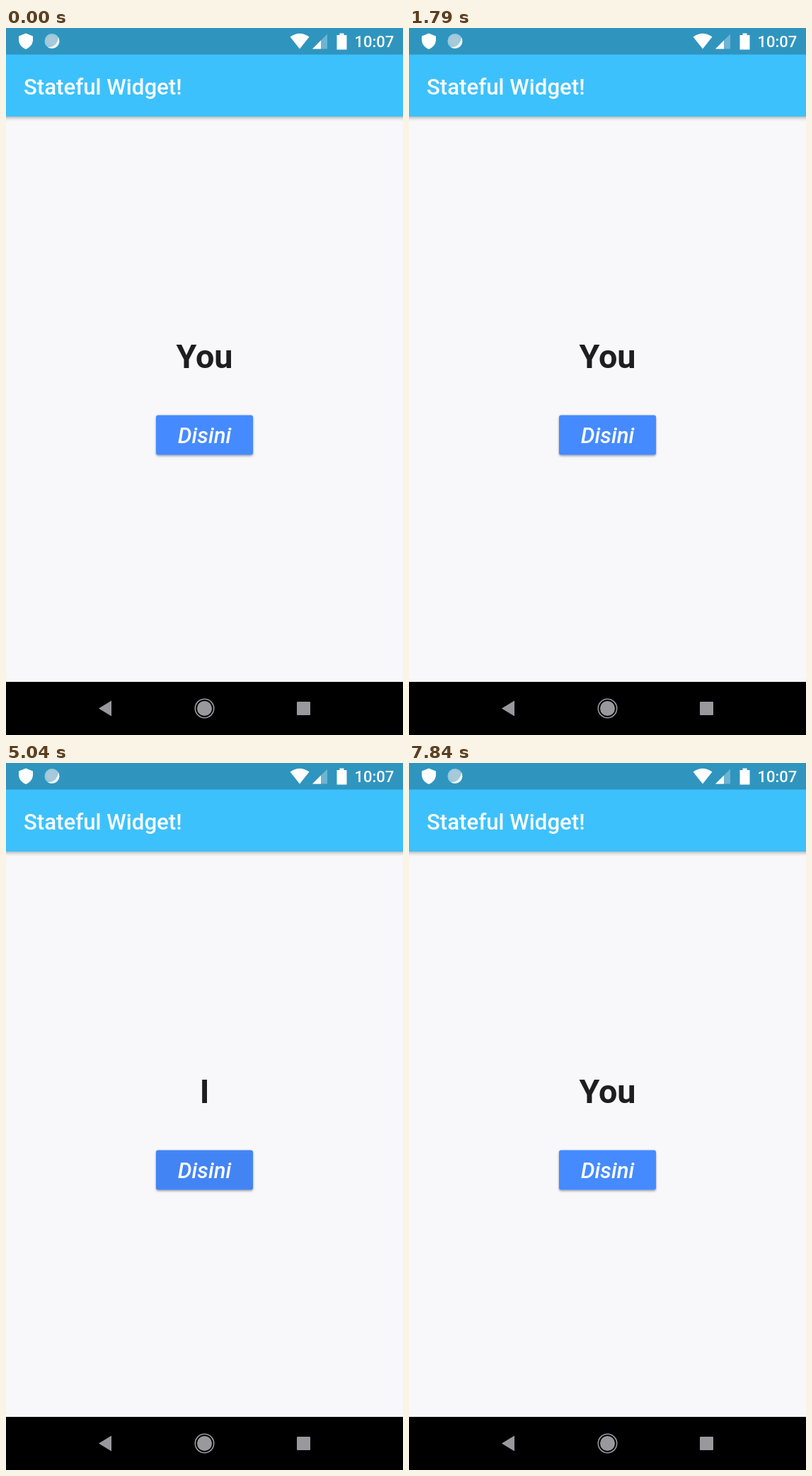
These frames come from a looping animation (561 by 998 pixels, 8 s). An HTML page:

```html
<!DOCTYPE html>
<html lang="en">
<head>
<meta charset="utf-8">
<title>Stateful Widget</title>
<style>
  html, body { margin: 0; width: 100%; height: 100%; overflow: hidden; background: #f8f8fb; }
  svg { display: block; width: 100%; height: 100%; }
  text { font-family: Roboto, sans-serif; font-weight: 500; fill: #fff; }
</style>
</head>
<body>
<svg viewBox="0 0 561 998">
  <defs>
    <filter id="barShadow" x="-5%" y="-5%" width="110%" height="120%">
      <feDropShadow dx="0" dy="2" stdDeviation="2.5" flood-opacity=".3"/>
    </filter>
    <filter id="buttonShadow" x="-10%" y="-10%" width="120%" height="130%">
      <feDropShadow dx="0" dy="1.5" stdDeviation="1.5" flood-opacity=".4"/>
    </filter>
    <clipPath id="buttonClip"><rect x="212" y="546.5" width="137" height="56" rx="3"/></clipPath>
  </defs>

  <rect width="561" height="998" fill="#f8f8fb"/>
  <rect x="-10" y="-10" width="581" height="135" fill="#3ec1fc" filter="url(#barShadow)"/>
  <rect width="561" height="37.5" fill="#2f95bf"/>
  <text x="25" y="93.5" font-size="31.2">Stateful Widget!</text>

  <!-- Status icons -->
  <g fill="#fff">
    <path d="M28 7.5 38 11.5V18Q37 26 28 30Q19 26 18 18V11.5Z"/>
    <circle cx="65" cy="18.5" r="10.5" opacity=".5"/>
    <circle cx="64" cy="17.5" r="7" fill="#a9c9d8"/>
    <path d="M74 13A10.5 10.5 0 0 1 59 27Q72 27 74 13Z" opacity=".85"/>
    <path d="M415 29.5 401.5 12.5Q415 3 428.5 12.5Z"/>
    <path d="M454 8.5V29.5H433Z" opacity=".3"/>
    <path d="M445 17.5V29.5H433Z"/>
    <path d="M471.5 7.5H477.5V10H481.5V30.5H467.5V10H471.5Z"/>
  </g>
  <text x="492.5" y="27" font-size="22">10:07</text>

  <text id="word" x="280.5" y="480" font-size="46.75" text-anchor="middle"
        style="font-weight:700;fill:#1e1e20">You</text>

  <rect x="212" y="546.5" width="137" height="56" rx="3" fill="#448aff" filter="url(#buttonShadow)"/>
  <g clip-path="url(#buttonClip)">
    <rect id="highlight" x="212" y="546" width="137" height="57" opacity="0"/>
    <circle id="ripple" cx="290" cy="578" r="0" opacity="0"/>
  </g>
  <text x="280.5" y="586" font-size="31.2" font-style="italic" text-anchor="middle">Disini</text>

  <!-- Navigation bar -->
  <rect y="923" width="561" height="75"/>
  <g fill="#99999d">
    <path d="M131 960.5 149 949.5V971.5Z"/>
    <circle cx="280.5" cy="960.5" r="10.5"/>
    <circle cx="280.5" cy="960.5" r="13.2" fill="none" stroke="#99999d" stroke-width="1.6"/>
    <rect x="411" y="951" width="19" height="19" rx="1"/>
  </g>
</svg>
<script>
const LOOP = 8000;
const taps = [[4800, "I"], [5600, "Love"], [6400, "You"]];
const [word, highlight, ripple] = ["word", "highlight", "ripple"].map(id => document.getElementById(id));
const clamp = v => Math.max(0, Math.min(1, v));

function draw(now) {
  const t = now % LOOP;
  let label = "You", ink = 0, spread = 0;
  for (const [at, text] of taps) {
    const age = t - at;
    if (age >= 0) label = text;
    if (age > -120 && age < 300) {
      ink = Math.min(clamp((age + 120) / 120), clamp((300 - age) / 150));
      spread = clamp((age + 120) / 250);
    }
  }
  if (word.textContent !== label) word.textContent = label;
  highlight.setAttribute("opacity", ink * .05);
  ripple.setAttribute("opacity", ink * .045);
  ripple.setAttribute("r", 90 * spread);
  requestAnimationFrame(draw);
}
requestAnimationFrame(draw);
</script>
</body>
</html>
```
